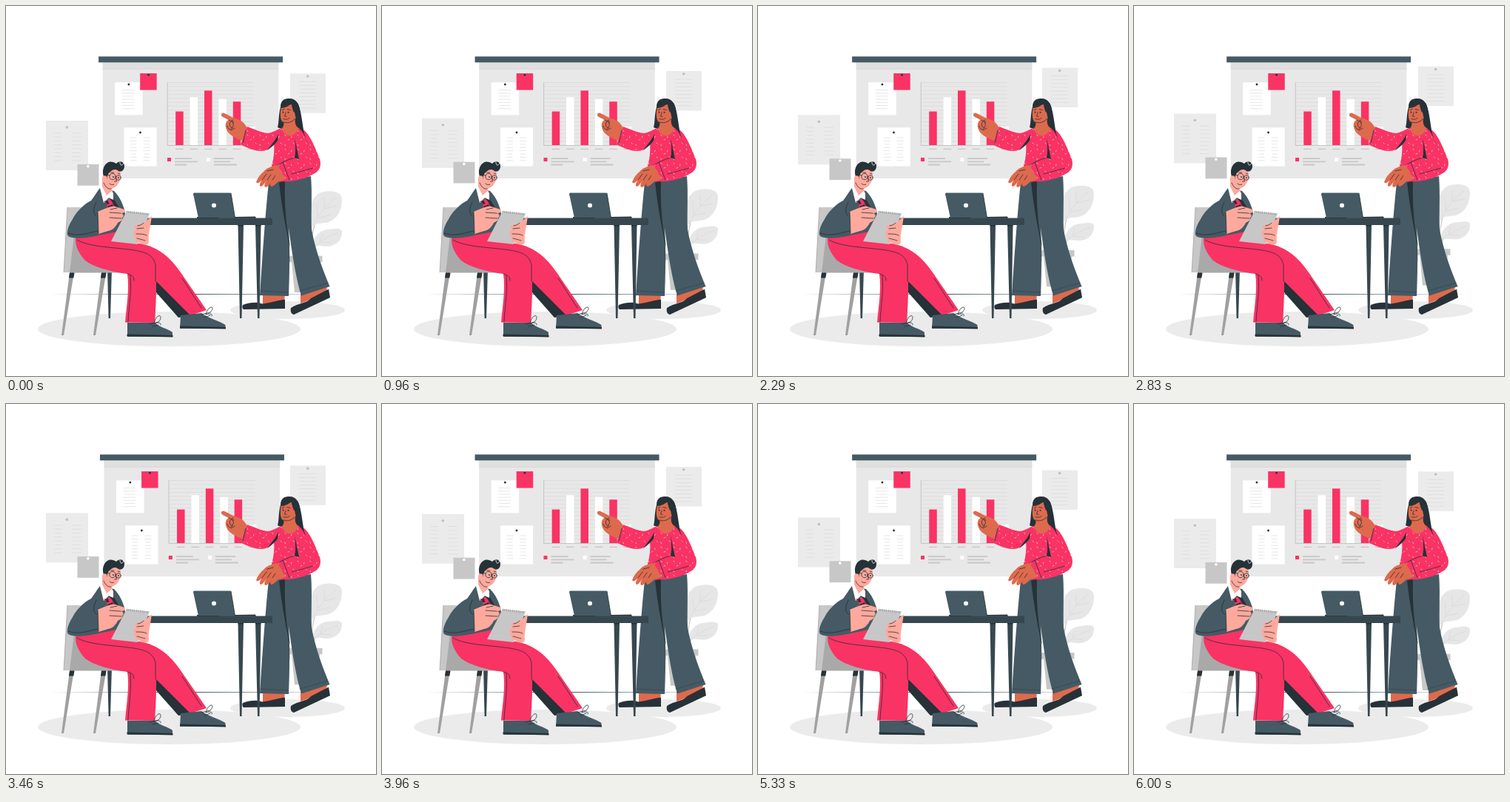
An HTML page for the animation above (6040 ms loop, 500 by 500 pixels).

```html
<!DOCTYPE html>
<html lang="en">
<head>
<meta charset="utf-8">
<title>Chart presentation</title>
<style>
  html, body { margin: 0; width: 100%; height: 100%; overflow: hidden; background: #fff; }
  svg { display: block; width: 100vw; height: 100vh; }
  .pink { fill: #f93364; }
  .slate { fill: #455a64; }
  .ink { fill: #263238; }
  .steel { fill: #37474f; }
  .tan { fill: #de6a4d; }
  .peach { fill: #ffa99d; }
  .pale { fill: #ebebeb; }
  .grey { fill: #c7c7c7; }
  .white { fill: #fff; }
  .line { fill: none; stroke: #263238; stroke-width: .8; stroke-linecap: round; stroke-linejoin: round; }
  .rule { fill: none; stroke: #d6d6d6; stroke-width: .6; }
  .bold { fill: none; stroke: #c7c7c7; stroke-width: 1.8; }
</style>
</head>
<body>
<svg viewBox="0 0 500 500">
  <defs>
    <pattern id="dashes" width="17" height="19" patternUnits="userSpaceOnUse">
      <rect class="pink" width="17" height="19"/>
      <path d="M3 3l1 1.500M12 5l-.5 1.800M7 10l1.800 -.7M3 16l.5 1.600M14 14l1.300 1.200" stroke="#ffc4d2" stroke-width=".8" stroke-linecap="round"/>
    </pattern>
  </defs>

  <ellipse class="pale" cx="220.500" cy="436.500" rx="177.500" ry="23.500"/>
  <ellipse class="pale" cx="380.500" cy="411" rx="77.500" ry="12"/>
  <path class="slate" d="M57 389.500Q254 388.600 451 389.500Q254 390.400 57 389.500Z"/>

  <g id="float">
    <path class="pale" d="M54 155.300h57v67h-57zM384 91.500h48v53.500h-48z"/>
    <circle cx="82.300" cy="164.300" r="1.800" fill="#c0c0c0"/>
    <circle cx="407.700" cy="95.300" r="1.800" fill="#c0c0c0"/>
    <g id="posterRules"></g>
    <path class="grey" d="M96.500 214.200H125.500V243H96.500z"/>
    <circle class="white" cx="110.800" cy="217" r="1.800"/>
    <path d="M386 346h38l-4 41.300h-30z" class="grey"/>
    <path d="M382 338h45.500v8.500H382z" class="grey"/>
    <path d="M411 338C412 320 415 300 420 287M412 337C414 328 419 322 427 317" fill="none" stroke="#c7c7c7" stroke-width="1.200"/>
    <path fill="#e6e6e6" d="M414 299C407 278 412 259 424 253C435 249 449 250 453 257C456 268 451 285 439 291C429 296 422 291 414 299ZM413 328C415 312 424 302 438 302C447 300 455 301 454 306C454 315 448 323 437 325C428 326 421 321 413 328Z"/>
    <path class="rule" d="M414 299C424 279 434 269 446 259M421 285L420 267M430 274L430 259M421 287L438 283M431 274L448 270M413 328C424 318 435 312 449 307M425 318L428 308M425 319L440 320"/>
  </g>

  <g id="board">
    <path fill="#e8e8e8" d="M131 76H368.600V233H131z"/>
    <path fill="#e0e0e0" d="M131 76H368.600V85H131z"/>
    <path d="M131 85.200H368.600" stroke="#cfcfcf" stroke-width=".7"/>
    <path class="slate" d="M125.400 68.300h249v8h-249z"/>
    <g id="boardRules"></g>
    <path d="M218.500 103V188.400H338" fill="none" stroke="#b4b4b4" stroke-width=".7"/>
    <path class="white" d="M147.500 103.200h37.500v44h-37.500zM159.800 164.200h44.200v52.300H159.800z"/>
    <g id="paperRules"></g>
    <path class="pink" d="M181.500 91h22.500v22.500h-22.500z"/>
    <g class="ink"><circle cx="166.200" cy="106" r="1.400"/><circle cx="181.800" cy="171" r="1.400"/><circle cx="192.800" cy="93.200" r="1.400"/></g>
    <g id="bars"></g>
    <path class="pink" d="M218.300 205h5v5h-5z"/>
    <path class="white" d="M271.600 205h5v5h-5z"/>
    <path class="bold" d="M228.300 206.200h23M228.300 210.400h31M228.300 214.500h16M281.300 206.200h27M281.300 210.400h22M281.300 214.500h31"/>
  </g>

  <!-- chair and far table leg -->
  <path class="steel" d="M137 355h6l-2 67h-2.400z"/>
  <path class="grey" d="M83 272H106L98 360H78z"/>
  <path d="M92 310L86 360.500H172V352L120 310z" fill="#a9a9a9"/>
  <path d="M83 272L78 360" stroke="#999" stroke-width=".7"/>
  <path fill="#a0a0a0" d="M86 360h6L78 445h-3zM129 360h6.500L121 445h-3z"/>
  <path class="ink" d="M86 360.500h6.500l-1.200 7H85zM129 360.500h6.500l-1.200 7H128z"/>

  <!-- woman -->
  <path class="ink" d="M371 136C371 128 376 124.500 383 125C392 125 396 132 397 141C398 154 400 163 403.500 177L390 174L367 164C369 158 368 147 371 136Z"/>
  <path class="tan" d="M347 389L377 389L376 400L347 403zM398 389L434 380L432 389L398 402z"/>
  <path class="ink" d="M320 404C330 400 340 400 346 402.500C357 401 367 398 377 396.500V409L321 410C319 408 319 406 320 404ZM385 408C395 401 407 402 412 395L436 382.500L438 394L389 417C385 416 384 412 385 408Z"/>
  <path class="slate" d="M355 238L412 230C414 252 412 278 413 302C418 330 428 356 437.500 379L399 391.500C391 365 386 330 382 300C384 330 383 365 382 392L343 391C346 345 350 285 355 238Z"/>
  <path class="ink" d="M369 239L377 236C376 266 378 295 384 325L382 319C377 294 372 267 369 239Z"/>
  <path class="line" d="M344 385L382 387M397 385L435 374M382 318L383 345" opacity=".45"/>
  <path class="tan" d="M375 152L391 150C390 158 391 163 397 166C394 173 387 177 382 176C377 175 374 170 372 166C376 163 376 158 375 152Z"/>
  <path class="tan" d="M326 165C323 159 319 155 313 153C305 151 299 146 294 144.500C290 144.500 290 148 293 150L301 154C296 156 296 162 298 167C301 174 309 178 319 182Z"/>
  <path class="line" d="M301 154L308 157M307 154C302 156 301 161 304 164C308 165 308 159 306 157M299 162C300 167 304 169 306 164M304 168L309 165"/>
  <path fill="url(#dashes)" d="M372 165C366 167 361 171 354 172C345 171 337 167 326 163L317 187C334 196 345 198 354 194L362 185C363 195 362 206 359 216L370 237C388 238 405 234 419 225C425 221 426 213 424 207C419 194 412 177 405 170C402 167 400 166 396 164C393 172 387 176 382 175C377 174 374 169 372 165Z"/>
  <path class="ink" d="M368 173C365 180 359 187 353 195C359 191 364 186 367 182ZM390 178L396 207L390 205C392 197 391 188 390 178Z"/>
  <path class="line" d="M390 205C382 207 374 211 367 215M374 211L383 235M324 168L320 186M386 227L415 219"/>
  <path class="tan" d="M367 215C358 217 352 219 349 223C344 227 340 232 338 238C340 241 343 238 346 235C343 239 342 243 344 244C347 244 350 238 353 235C349 240 348 244 351 245C355 244 358 239 360 235C357 240 356 243 359 244C364 242 366 238 369 237L378 234Z"/>
  <path class="line" d="M346 235L352 227M353 235L358 228M360 235L364 229M353 223L361 221"/>
  <path class="tan" d="M372 135C370.500 143 370 152 373 156C378 159 388 157 391 152C395 150 397 144 394 141C392 140 390 142 389 144L386 133Z"/>
  <path class="ink" d="M371 138C377 138 383 135 386 131C386 137 388 142 390 144C392 152 393 164 399 168L403 174C400 154 398 137 394 131L383 126L374 130Z"/>
  <path class="line" d="M373 140.500L376 139.500M380 139.500L384.500 140.500M378 144L376.500 149L379 149.500M375 152.500C378 154 381 153 383 151.500M376 157C381 159 386 157 390 153M397 146C399 157 400 165 404 177"/>
  <circle class="ink" cx="374.500" cy="143.500" r="1"/><circle class="ink" cx="381.500" cy="143.800" r="1"/>

  <!-- table and laptop -->
  <path class="steel" d="M313.500 295h7.500L318.500 422h-2.500zM337 295h7.500L342.500 422H340zM180 286.500H360V296H180z"/>
  <path class="ink" d="M313.500 296h7.500v1.500h-7.500zM337 296h7.500v1.500h-7.500z"/>
  <path class="ink" d="M258 286.800V285H308L337 284.500L338 286.800Z"/>
  <path class="slate" d="M254.500 252.500H302.500Q304 252.500 304.300 254L309.500 286.500H260L253 254Q252.800 252.500 254.500 252.500Z"/>
  <path class="line" d="M304 253L309.500 286M259 286.500H287"/>
  <circle class="white" cx="281" cy="269.500" r="3"/>

  <!-- man: legs and shoes -->
  <path class="ink" d="M202 368L252 418L233 421L202 386z"/>
  <path class="pink" d="M172 320C204 322 222 340 236 360L271 411L249 418L202 371L190 350Z"/>
  <path class="pink" d="M95 312C92 319 96 332 107 344C119 353 141 359 164 362C167 382 163 405 161 427.500L201 428C203 400 204 372 202 348C198 337 190 328 177 321L160 300L110 306Z"/>
  <path class="line" d="M96 316C110 325 142 326 166 329C189 332 199 336 202 350L202 372M164 362C169 363 173 365 173 371M168 364C170 386 166 405 165 427M238 368L264 408"/>
  <path class="slate" d="M164 428H201C207 434 219 436 225 441V447H164zM236 418L264 415C273 422 288 425 296.500 431V436H235z"/>
  <path class="ink" d="M163.500 443.500L225.500 445V447.500L163.500 446zM235 432.500L297 434V436.500L235 435z"/>
  <path class="line" d="M194 430L206 427C211 422 209 417 206 419C202 421 201 425 200 429C206 427 210 428 209 431M198 433L206 431M264 417L276 414C281 409 279 405 275 408C272 410 271 414 270 417C275 415 280 416 278 419M268 421L276 418"/>

  <!-- man: torso and head -->
  <path class="slate" d="M127 246C122 252 119 258 115 263C105 268 95 278 90 288C84 297 81 307 84 311C92 316 112 313 125 310L164 302L160 275C156 262 151 255 146 250Z"/>
  <path class="line" d="M122 265C119 272 116 279 122 284M84 307C96 312 111 307 124 304"/>
  <path class="ink" d="M137 263L145 260L153 273L140 274Z"/>
  <path class="peach" d="M130 231L143 246L144 253L136 259L130 251Z"/>
  <path class="white" d="M127 246L130 244L136 256L143 250L145 253L145 262L139 259L132 266Z"/>
  <path class="pink" d="M132 264L140 261L143 264L147 272L137 274L136 267Z"/>
  <path class="ink" d="M134 264l2.500 4 3-.5-2-5zM137 271l7-3 1 2-7 3z"/>
  <path class="peach" d="M132 224C130 233 132 242 138 246C144 249 150 244 153 238C156 231 155 224 153 219L139 218Z"/>
  <path class="ink" d="M132 230C129 222 133 214 137 212C141 209 146 211 149 213C153 208 160 210 160 216C160 222 156 225 152 223C147 219 143 222 140 225C137 227 137 230 137 234L134 231Z"/>
  <path class="line" d="M154 211C154 216 157 217 159 212" style="stroke:#fff"/>
  <circle class="peach" cx="133.500" cy="232.500" r="3.200"/>
  <g class="line"><circle cx="144" cy="230.500" r="4.200"/><circle cx="152" cy="232" r="3.300"/><path d="M135 228L140 229M148 230L149 231M148 232L149.500 237L146.500 237M140 240C142 242 145 242 146 241M142 225L146 225M151 226L154 227M132 239C134 244 138 248 142 247"/></g>
  <circle class="ink" cx="145" cy="231" r=".9"/><circle class="ink" cx="152" cy="232" r=".9"/>

  <!-- hands and notepad -->
  <path class="peach" d="M124 278C134 274 142 270 148 271L160 275C162 278 159 280 155 280C159 281 160 284 157 286C158 290 154 291 151 293C148 299 144 303 138 304L125 308Z"/>
  <path class="line" d="M140 279L155 280M140 286L156 287M141 275L150 273M124 279L125 307"/>
  <path class="grey" d="M163 277L194 280.500L178 322L142 318Z"/>
  <path d="M163 278L194 281.500" stroke="#888" stroke-width="3" stroke-dasharray=".7 1.900"/>
  <path class="peach" d="M197 284C193 286 191 291 186 293L176 296C172 298 173 301 177 301L173 304C170 307 172 309 176 308C171 311 172 315 177 314C173 316 175 319 179 319C186 324 191 324 193 319C192 311 194 302 195 297Z"/>
  <path class="line" d="M177 301L186 300M176 308C181 308 187 308 190 310M177 314C181 315 185 316 188 317M186 293C184 295 181 297 178 297"/>
</svg>
<script>
  const $ = id => document.getElementById(id);

  function rules(id, x, y, width, count, step) {
    let d = '';
    for (let i = 0; i < count; i++) {
      const trim = i % 3 === 2 ? 2 : 0;
      d += `M${x + trim / 2} ${y + i * step}h${width - trim}`;
    }
    $(id).innerHTML += `<path class="rule" d="${d}"/>`;
  }
  rules('posterRules', 65, 172, 11, 8, 5.3);
  rules('posterRules', 89, 172, 13, 8, 5.3);
  rules('posterRules', 396, 102.5, 23, 8, 5.1);
  rules('boardRules', 219, 103.5, 116, 16, 5.3);
  rules('paperRules', 157, 113.5, 17, 7, 4.2);
  rules('paperRules', 168, 178, 9, 8, 4.4);
  rules('paperRules', 186, 178, 9, 8, 4.4);

  [142.5, 123.3, 114.3, 125.7, 129.2, 163].forEach((top, i) => {
    const x = 229.5 + i * 19.4;
    $('bars').innerHTML += `<path class="${i % 2 ? 'white' : 'pink'}" d="M${x} ${top}h10.500V188h-10.500z"/>
      <path d="M${x} 193.300h10.500" stroke="#b8b8b8" stroke-width=".9"/>`;
  });

  const LOOP = 6040, LEAD = 95, SHAKE = 3000, RISE = 3000;
  const shakeStops = [0, -1, 2, -4, 4, -4, 4, -4, 2, -1, 0];

  function shake(t) {
    const p = t % SHAKE / SHAKE * 10, i = Math.floor(p);
    return shakeStops[i] + (shakeStops[i + 1] - shakeStops[i]) * (p - i);
  }

  function float(t) {
    return Math.abs(t % (2 * RISE) - RISE) / RISE * 10 - 10;
  }

  function draw(now) {
    const t = now % LOOP + LEAD;
    $('board').setAttribute('transform', `translate(${shake(t)} 0)`);
    $('float').setAttribute('transform', `translate(0 ${float(t)})`);
    requestAnimationFrame(draw);
  }
  draw(performance.now());
</script>
</body>
</html>
```
